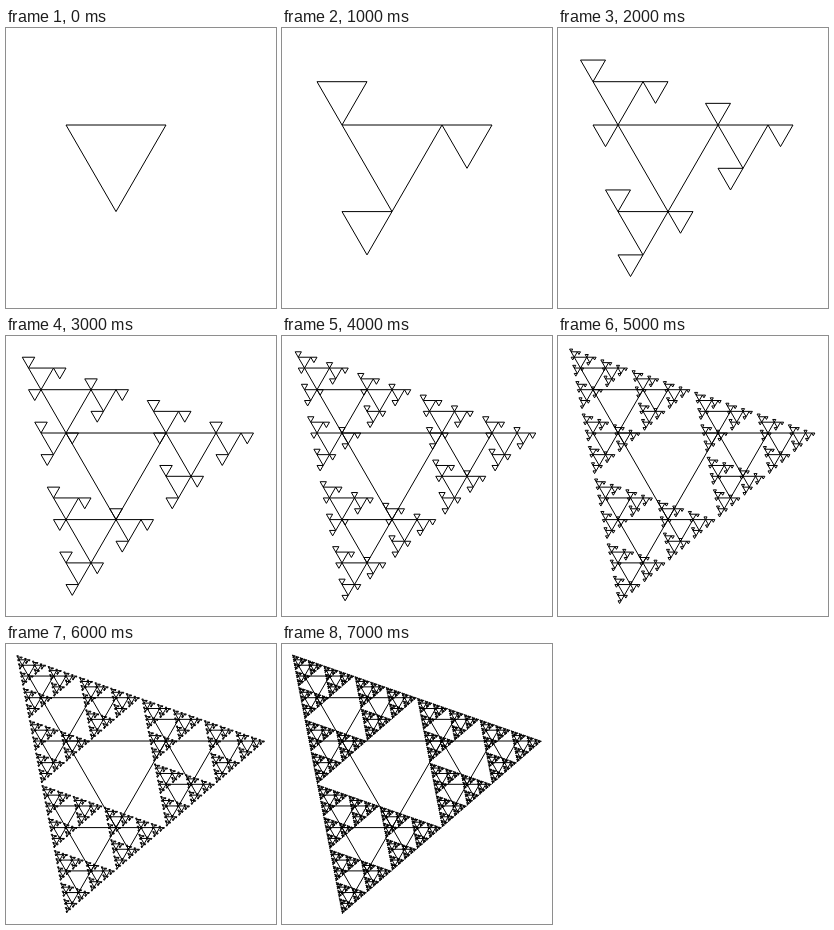
Recreate the animation shown at these times as an HTML page. Size 270 px wide and 280 px high, loop 8 s.

```html
<!DOCTYPE html>
<html lang="en">
<head>
<meta charset="utf-8">
<title>Triangle fractal</title>
<style>
html, body { margin: 0; width: 100%; height: 100%; overflow: hidden; background: #fff; }
svg { display: block; }
path { fill: none; stroke: #000; stroke-width: 1; stroke-linejoin: miter; }
</style>
</head>
<body>
<svg id="stage" width="270" height="280" viewBox="0 0 270 280"></svg>
<script>
const STEP = 1000, LEVELS = 8;
const RATIO = Math.sqrt(3) / 2;
const stage = document.getElementById('stage');

// A triangle points down; x, y is its top left corner, s its side.
function children({ x, y, s }) {
  const h = s / 2;
  return [
    { x: x - h / 2, y: y - h * RATIO, s: h },
    { x: x + s, y, s: h },
    { x, y: y + s * RATIO, s: h }
  ];
}

function outline({ x, y, s }) {
  return `M${x} ${y}h${s}L${x + s / 2} ${y + s * RATIO}Z`;
}

const paths = [];
let row = [{ x: 60, y: 97, s: 100 }];
for (let i = 0; i < LEVELS; i++) {
  const path = document.createElementNS('http://www.w3.org/2000/svg', 'path');
  path.setAttribute('d', row.map(outline).join(''));
  stage.appendChild(path);
  paths.push(path);
  row = row.flatMap(children);
}

let shown = -1;
function render(time) {
  const level = Math.floor(time / STEP) % LEVELS;
  if (level === shown) return;
  shown = level;
  paths.forEach((path, i) => path.setAttribute('visibility', i <= level ? 'visible' : 'hidden'));
}

const start = performance.now();
function tick() {
  render(performance.now() - start);
  requestAnimationFrame(tick);
}
tick();
</script>
</body>
</html>
```
